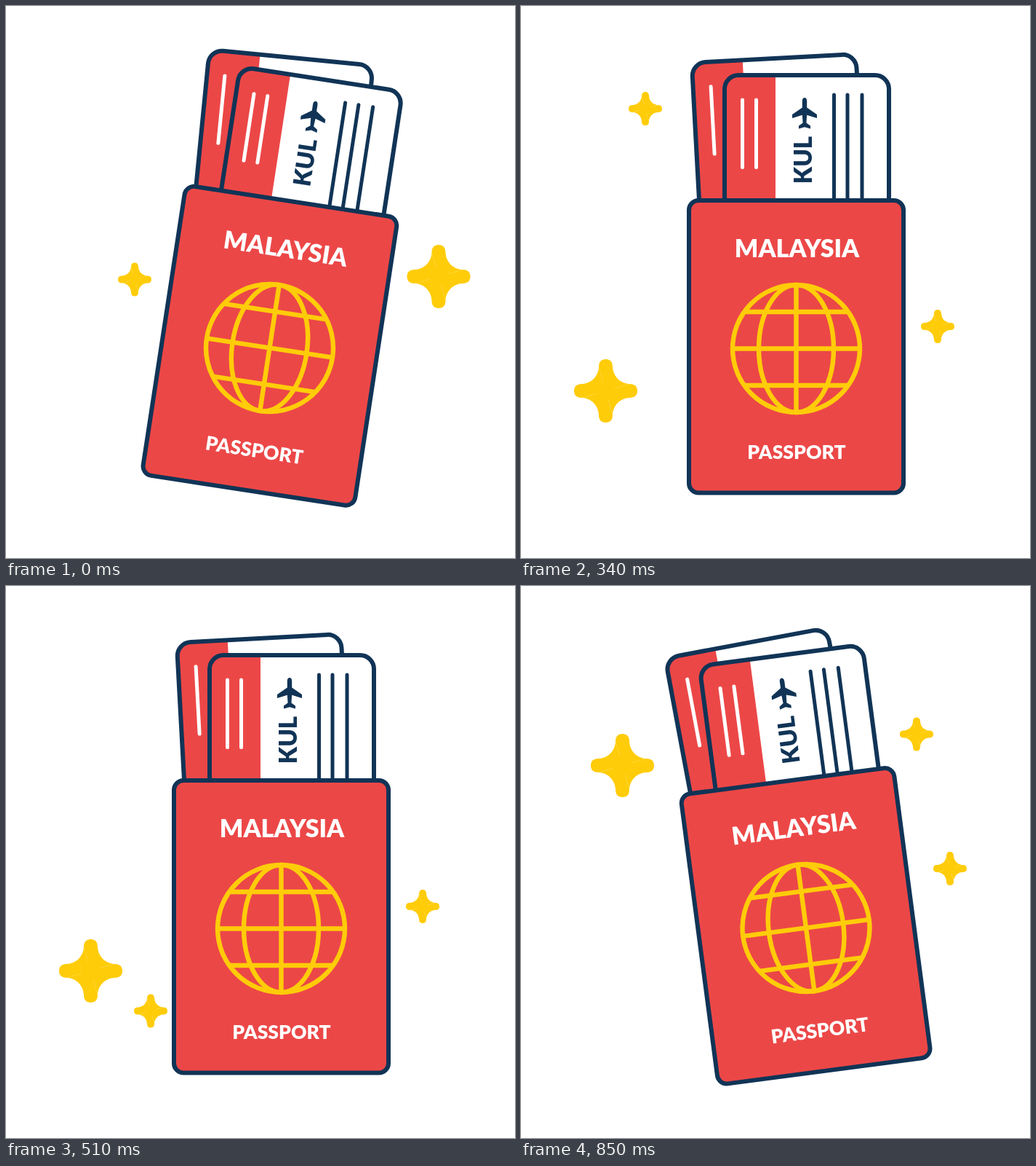
An HTML page that plays this animation: 700 px wide and 758 px high, repeating every 1020 ms.

```html
<!DOCTYPE html>
<html lang="en">
<head>
<meta charset="utf-8">
<title>Passport</title>
<style>
  html, body { margin: 0; width: 100%; height: 100%; overflow: hidden; background: #fff; }
  svg { display: block; width: 100%; height: 100%; }
  text { font-family: Lato, sans-serif; font-weight: 900; text-anchor: middle; }
  .navy { stroke: #113456; }
  .outline { fill: none; stroke: #113456; stroke-width: 6; }
  .lines { stroke-width: 5; stroke-linecap: round; }
  .globe { fill: none; stroke: #ffcc09; stroke-width: 6.4; }
</style>
</head>
<body>
<svg viewBox="0 0 700 758">
  <defs>
    <g id="ticket">
      <rect width="226" height="220" rx="19" fill="#fff"/>
      <path d="M70 0H19A19 19 0 0 0 0 19V210H70Z" fill="#ec4747"/>
      <path class="lines" d="M24.5 34V126.5M43.5 34V126.5" stroke="#fff"/>
      <rect class="outline" width="226" height="220" rx="19"/>
    </g>
    <path id="arm" d="M0 0L-9.5 -33C-9.5 -40 -6 -43.5 0 -43.5S9.5 -40 9.5 -33C10 -20 20 -10 33 -9.5Z"/>
    <g id="star" fill="#ffcc09">
      <rect x="-12" y="-12" width="24" height="24"/>
      <use href="#arm"/>
      <use href="#arm" transform="rotate(90)"/>
      <use href="#arm" transform="rotate(180)"/>
      <use href="#arm" transform="rotate(270)"/>
    </g>
  </defs>

  <g id="passport">
    <use href="#ticket" transform="translate(234.8 78.1) rotate(-3.1)"/>
    <use href="#ticket" x="280" y="95"/>
    <path class="lines navy" d="M430.5 122V270M449 122V270M469 122V270"/>
    <path fill="#113456" d="M390 126C387.5 126 386.8 128.500 386.800 131V139.500L373 149V154L386.800 149.800L387.600 160.500L382 164.500V168.500L390 166.200L398 168.500V164.500L392.400 160.500L393.200 149.800L407 154V149L393.200 139.500V131C393.200 128.500 392.500 126 390 126Z"/>
    <text transform="translate(400 211.500) rotate(-90)" font-size="33" fill="#113456">KUL</text>

    <rect x="231" y="267" width="295" height="401.500" rx="13" fill="#ec4747"/>
    <rect class="outline" x="231" y="267" width="295" height="401.500" rx="13"/>
    <g fill="#fff">
      <text x="379.500" y="344.500" font-size="34">MALAYSIA</text>
      <text x="379" y="622" font-size="26.500">PASSPORT</text>
    </g>
    <g class="globe" transform="translate(378.5 470.5)">
      <circle r="87.500"/>
      <ellipse rx="51.500" ry="87.500"/>
      <path d="M0 -87V87M-87 0H87M-71 -50.500H71M-71 50.500H71"/>
    </g>
  </g>
  <g id="stars"></g>
</svg>
<script>
  const STEP = 170, STEPS = 6, SMALL = 0.53;

  // Each pose holds for two steps: shift x, shift y, tilt in degrees
  const poses = [[-16, -1, 8.7], [0, 0, 0], [13.5, -1, -7.5]];

  // x, y, scale, first step; every star shows for two steps
  const stars = [
    [177, 375.5, SMALL, 0], [595, 371.5, 1, 0],
    [171, 141, SMALL, 1],
    [116.5, 528.5, 1, 2], [573, 440, SMALL, 2],
    [199, 583.5, SMALL, 3],
    [139.5, 246.5, 1, 4], [544, 203.5, SMALL, 4], [590, 388, SMALL, 4]
  ];

  const passport = document.getElementById('passport');
  const starLayer = document.getElementById('stars');
  starLayer.innerHTML = stars.map(([x, y, scale]) =>
    `<use href="#star" transform="translate(${x} ${y}) scale(${scale})"/>`).join('');

  function draw(now) {
    const step = Math.floor(now / STEP) % STEPS;
    const [dx, dy, tilt] = poses[step >> 1];
    passport.setAttribute('transform', `translate(${dx} ${dy}) rotate(${tilt} 378.5 470.5)`);
    stars.forEach(([, , , first], i) => {
      const visible = step === first || step === first + 1;
      starLayer.children[i].setAttribute('visibility', visible ? 'visible' : 'hidden');
    });
  }

  const start = performance.now();
  function tick() {
    draw(performance.now() - start);
    requestAnimationFrame(tick);
  }
  tick();
</script>
</body>
</html>
```
